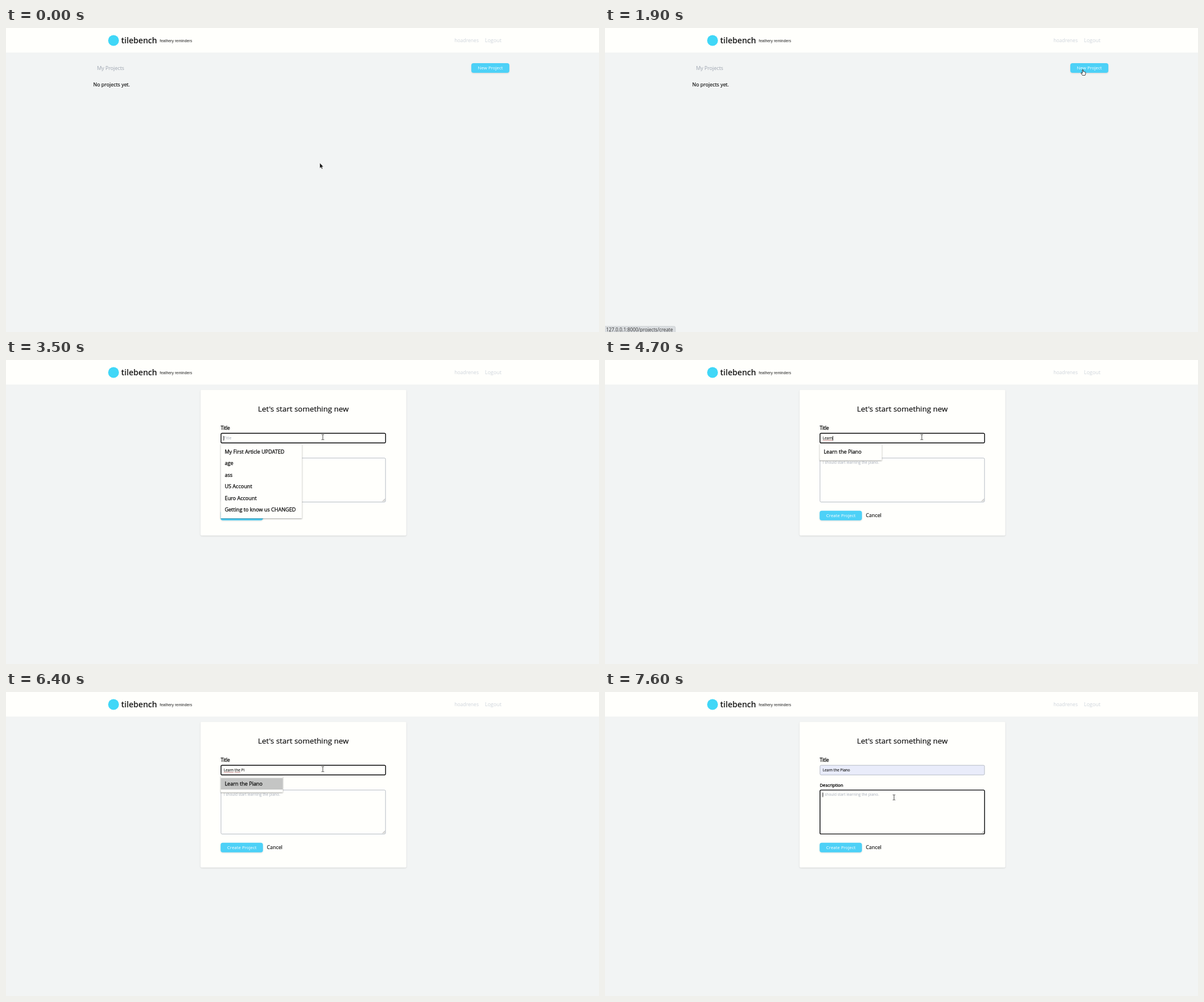
An HTML page for the animation above (8 s loop, 1045 by 536 pixels).

```html
<!DOCTYPE html>
<html lang="en">
<head>
<meta charset="utf-8">
<title>Project board</title>
<style>
  html, body { margin: 0; width: 100%; height: 100%; overflow: hidden; background: #f2f4f4; }
  svg { display: block; width: 100%; height: 100%; }
  text { font-family: "Open Sans", "Noto Sans", sans-serif; white-space: pre; }
  .card { fill: #fffffc; }
  .soft { filter: drop-shadow(0 1px 1px rgba(0, 0, 0, .13)); }
  .drop { filter: drop-shadow(0 1px 1px rgba(0, 0, 0, .38)); }
  .button { fill: #4dd1f7; }
  .field { fill: #fffffc; stroke: #b5bbc5; }
  .ring { fill: none; stroke: #101010; stroke-width: 1.4; }
  .hint { fill: #a4abb8; }
  .ink { stroke: #000; stroke-width: .12; }
  .medium { stroke: #111; stroke-width: .3; }
  .item { font-size: 9.1px; fill: #111; }
</style>
</head>
<body>
<svg viewBox="0 0 1045 536" preserveAspectRatio="none">
  <rect width="1045" height="536" fill="#f2f4f4"/>
  <rect class="card" width="1045" height="43.6" style="filter:drop-shadow(0 .5px .6px rgba(0,0,0,.08))"/>
  <circle cx="189.5" cy="22" r="9.5" fill="#40d7f7"/>
  <text x="203" y="27" font-size="14.1" font-weight="600" fill="#151515">tilebench</text>
  <text x="271" y="25" font-size="6.84" fill="#222" style="font-family:'Liberation Sans',Arial,sans-serif">feathery reminders</text>
  <text x="833" y="25.3" font-size="8.6" fill="#ced4db" text-anchor="end">hoadrenes</text>
  <text x="844" y="25.3" font-size="9" fill="#ced4db">Logout</text>

  <g id="list">
    <text x="160.5" y="73.6" font-size="8.9" fill="#9ca3af">My Projects</text>
    <text class="ink" x="153.7" y="102.7" font-size="8.9">No projects yet.</text>
    <rect class="button soft" x="820" y="62" width="67" height="17" rx="4"/>
    <text x="853.5" y="73.3" font-size="7.9" fill="#fff" text-anchor="middle">New Project</text>
    <g id="status">
      <path d="M-1 537V526H121.5Q124 526 124 528.5V537Z" fill="#dadde0" stroke="#c3c7cb" stroke-width=".7"/>
      <text x="2" y="535.2" font-size="8.33" fill="#333">127.0.0.1:8000/projects/create</text>
    </g>
  </g>

  <g id="form">
    <rect class="card soft" x="342.8" y="52.8" width="362.7" height="256.8" rx="2"/>
    <text class="ink" x="524" y="91.3" font-size="13.4" text-anchor="middle">Let's start something new</text>
    <text class="medium" x="378.4" y="123" font-size="8.2">Title</text>
    <text class="medium" x="378.4" y="167" font-size="7.75">Description</text>
    <rect id="titleBox" class="field" x="378.9" y="129.2" width="289.9" height="17" rx="2"/>
    <rect class="field" x="378.9" y="172.9" width="289.9" height="77.5" rx="2"/>
    <path d="M663.5 249.3L668 244.8M666 249.3L668 247.3" stroke="#777" stroke-width=".7"/>
    <text class="hint" x="383.7" y="183.2" font-size="6.57">I should start learning the piano.</text>
    <rect class="button soft" x="378.2" y="265.8" width="74.6" height="17" rx="4"/>
    <text x="415.7" y="277.1" font-size="7.9" fill="#fff" text-anchor="middle">Create Project</text>
    <text class="ink" x="459.7" y="277" font-size="8.9">Cancel</text>
    <rect id="titleRing" class="ring" x="378.9" y="129.2" width="289.9" height="17" rx="2"/>
    <rect id="areaRing" class="ring" x="378.9" y="172.9" width="289.9" height="77.5" rx="2"/>
    <text id="titleHint" class="hint" x="383.7" y="140.2" font-size="7">Title</text>
    <text id="typed" class="ink" x="383.7" y="140.2" font-size="6.57" fill="#111"></text>
    <path id="spell" stroke="#a65555" stroke-width=".7" fill="none"/>
    <rect id="caret" y="134" width=".9" height="8" fill="#111"/>
    <rect id="areaCaret" x="383.4" y="177.3" width=".9" height="8" fill="#111"/>
    <g id="menu">
      <rect id="menuBox" class="card drop" x="378.4" y="147.8"/>
      <rect id="pick" x="378.4" y="151.6" width="109.4" height="20.4" fill="#c4c5c4"/>
      <g id="items"></g>
    </g>
  </g>

  <g id="cursor">
    <path id="arrow" d="M0 0V9.2L2.1 7.4 3.6 10.6 5.1 9.9 3.6 6.8H6.4Z" fill="#111" stroke="#fff" stroke-width=".5"/>
    <path id="hand" d="M-.8 .8Q0 -.3 .8 .8V4Q1.7 3.3 2.3 4.2 3.2 3.6 3.7 4.6 4.9 4.2 4.9 5.6V8L4 10.4H-.6L-3 6.9Q-3.3 5.6 -2.1 5.9L-.8 7Z" fill="#fff" stroke="#111" stroke-width=".8" stroke-linejoin="round"/>
    <path id="beam" d="M-2.2 -4.5H-.6L0 -4 .6 -4.5H2.2M0 -4V4M-2.2 4.5H-.6L0 4 .6 4.5H2.2" fill="none" stroke="#333" stroke-width=".9"/>
  </g>
</svg>
<script>
const LOOP = 8000, STEP = 100;
const TITLE = "Learn the Piano";
const SUGGESTIONS = ["My First Article UPDATED", "age", "ass", "US Account",
  "Euro Account", "Getting to know us CHANGED"];

// [time, letters typed so far]
const KEYS = [[4100, 1], [4300, 2], [4400, 3], [4500, 4], [4600, 5], [5000, 7],
  [5100, 8], [5200, 10], [5500, 11], [5700, 12], [6600, 15]];

// [time, x, y]
const PATH = [[0, 553, 238], [400, 553, 238], [500, 550.5, 237.5], [600, 550.5, 237.5],
  [1400, 842, 72], [1500, 842, 72], [1900, 842, 73], [2300, 838, 73], [2600, 838, 73],
  [2700, 709, 127], [2800, 709, 127], [3000, 630, 153], [3200, 558.3, 136],
  [7200, 558.3, 136], [7400, 509.3, 185.8], [LOOP, 509.3, 185.8]];

const el = id => document.getElementById(id);
const show = (id, on) => el(id).setAttribute("visibility", on ? "inherit" : "hidden");
const within = (t, from, to) => t >= from && t < to;
const ramp = (t, from, to) => Math.min(1, Math.max(0, (t - from) / (to - from)));
const smooth = u => u * u * (3 - 2 * u);

function pointer(t) {
  const i = PATH.findIndex((p, n) => n > 0 && t < p[0]);
  const [t0, x0, y0] = PATH[i - 1], [t1, x1, y1] = PATH[i];
  const u = ramp(t, t0, t1), k = t1 - t0 > 500 ? smooth(u) : u;
  return [x0 + (x1 - x0) * k, y0 + (y1 - y0) * k];
}

function overField(x, y) {
  return within(x, 378, 669) && (within(y, 129, 147) || within(y, 172, 251));
}

function drawCursor(t) {
  const [x, y] = pointer(t);
  const kind = within(t, 1300, 2600) ? "hand" : t >= 2600 && overField(x, y) ? "beam" : "arrow";
  el("cursor").setAttribute("transform", `translate(${x} ${y})`);
  for (const id of ["arrow", "hand", "beam"]) show(id, id === kind);
}

function drawTitle(t) {
  const count = KEYS.reduce((n, [at, len]) => t >= at ? len : n, 0);
  const typed = el("typed");
  typed.textContent = TITLE.slice(0, count);
  const edge = n => 383.7 + (n ? typed.getSubStringLength(0, n) : 0);
  el("caret").setAttribute("x", edge(count) - (count ? 0 : .4));
  show("caret", within(t, 3500, 3900) || within(t, 4100, 6400) || within(t, 6800, 7300));
  show("titleHint", !count);

  let line = "";
  if (within(t, 4700, 6600)) line += `M${edge(0)} 141.5H${edge(5)}`;
  if (within(t, 5200, 6600)) line += `M${edge(6)} 141.5H${edge(9)}`;
  el("spell").setAttribute("d", line);

  el("titleBox").style.fill = t >= 6600 ? "#e9ecfa" : "";
  show("titleRing", within(t, 3500, 7600));
}

let listed = "";
function drawMenu(t) {
  show("menu", within(t, 3500, 6700));
  show("pick", within(t, 6400, 6700));
  const names = t < 4100 ? SUGGESTIONS : [TITLE];
  if (listed === names[0]) return;
  listed = names[0];
  el("menuBox").setAttribute("width", names.length > 1 ? 143.2 : 109.4);
  el("menuBox").setAttribute("height", 8.6 + 20.45 * names.length);
  el("items").innerHTML = names.map((name, i) =>
    `<text class="item medium" x="385.4" y="${165 + 20.45 * i}">${name}</text>`).join("");
}

function draw(now) {
  const t = Math.floor(now % LOOP / STEP) * STEP;
  show("list", t < 2600);
  show("form", t >= 2600);
  el("status").setAttribute("opacity", ramp(t, 1500, 1800) * (1 - ramp(t, 2000, 2300)));
  drawTitle(t);
  drawMenu(t);
  show("areaRing", t >= 7600);
  show("areaCaret", t >= 7600);
  drawCursor(t);
}

const start = performance.now();
function tick() {
  draw(performance.now() - start);
  requestAnimationFrame(tick);
}
tick();
</script>
</body>
</html>
```
